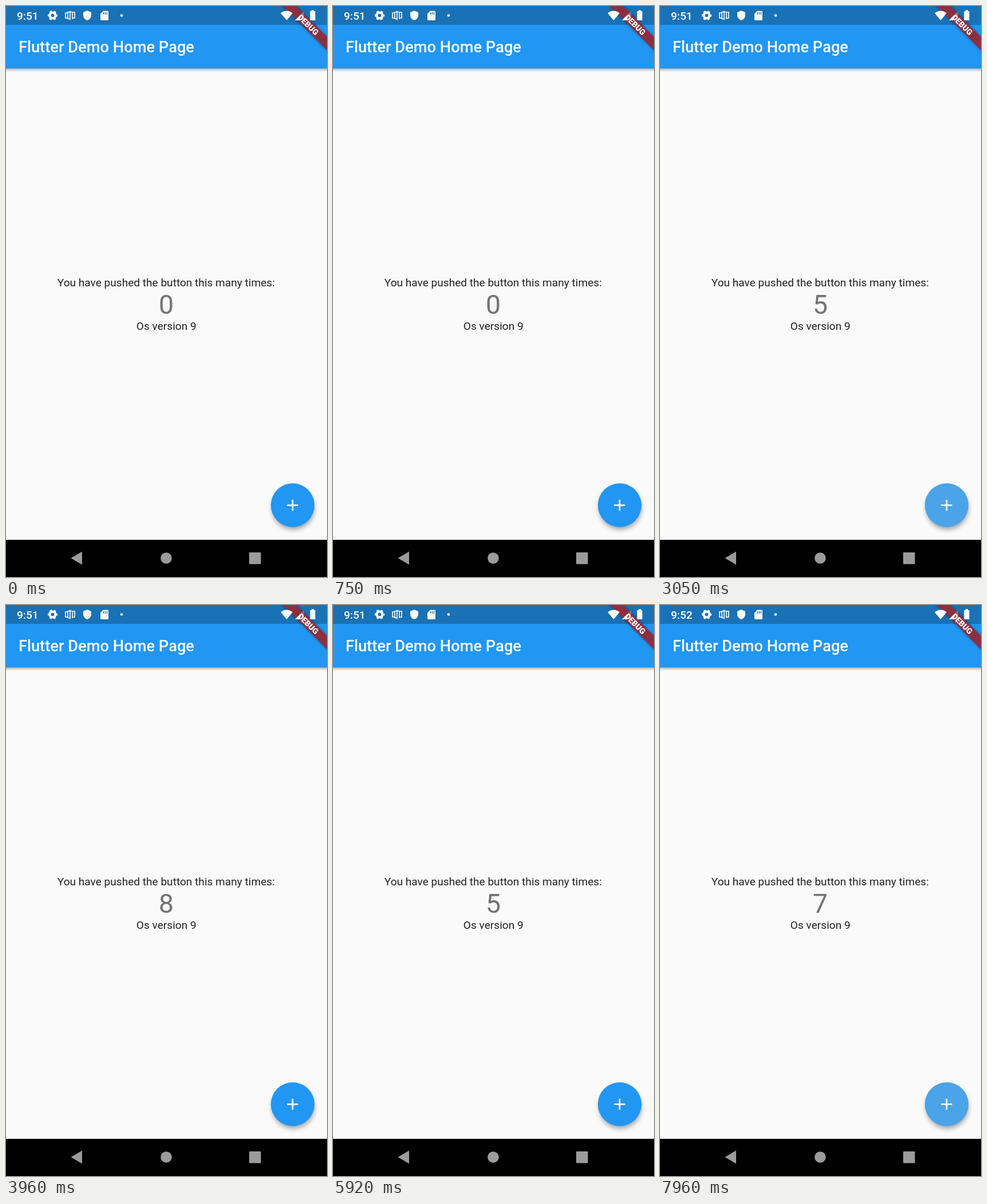
These frames come from a looping animation (561x998 px, 8 s). An HTML page:

```html
<!DOCTYPE html>
<html lang="en">
<head>
<meta charset="utf-8">
<title>Counter demo</title>
<style>
  html, body { margin: 0; width: 100%; height: 100%; overflow: hidden; background: #fafafa; }
  svg { display: block; width: 561px; height: 998px; }
  text { font-family: Roboto, sans-serif; font-size: 19.1px; }
  .mid { text-anchor: middle; }
</style>
</head>
<body>
<svg viewBox="0 0 561 998">
  <defs>
    <clipPath id="disc"><circle cx="501" cy="872.5" r="38.2"/></clipPath>
    <filter id="soft" x="-30%" y="-30%" width="160%" height="160%"><feGaussianBlur stdDeviation="4.5"/></filter>
    <filter id="thin" x="-10%" y="-30%" width="120%" height="160%"><feGaussianBlur stdDeviation="2.5"/></filter>
  </defs>
  <rect width="561" height="998" fill="#fafafa"/>

  <!-- app bar -->
  <rect x="-10" y="34" width="581" height="77" fill="#000" opacity=".4" filter="url(#thin)"/>
  <rect width="561" height="109" fill="#2196f3"/>
  <rect width="561" height="33" fill="#1971b6"/>
  <text x="22" y="81" fill="#fff" style="font-size:27.27px;font-weight:500">Flutter Demo Home Page</text>

  <!-- body -->
  <g class="mid" fill="#000" fill-opacity=".87">
    <text x="279.8" y="489.5">You have pushed the button this many times:</text>
    <text id="count" x="280" y="538" fill-opacity=".54" style="font-size:46.4px">0</text>
    <text x="280.3" y="566">Os version 9</text>
  </g>

  <!-- action button -->
  <circle cx="502" cy="878" r="37" fill="#000" opacity=".36" filter="url(#soft)"/>
  <circle cx="501" cy="872.5" r="38.2" fill="#2196f3"/>
  <g id="ripples" clip-path="url(#disc)" fill="#c8c8c8"></g>
  <path d="M491.3 872.7h19.2M500.9 863.1v19.2" stroke="#fff" stroke-width="2.7"/>

  <!-- corner banner -->
  <g transform="translate(561 0) rotate(45)">
    <rect x="-64" y="38.2" width="128" height="16.4" fill="#000" opacity=".4" filter="url(#thin)"/>
    <rect x="-64" y="38.2" width="128" height="16.4" fill="#8b3040"/>
    <text class="mid" x="0" y="51.4" fill="#fff" style="font-size:13.9px;font-weight:900">DEBUG</text>
  </g>

  <!-- status bar -->
  <g fill="#fff">
    <text id="clock" x="19" y="23.5" style="font-weight:500">9:51</text>
    <circle cx="81.5" cy="16.5" r="5" fill="none" stroke="#fff" stroke-width="4.2"/>
    <circle cx="81.5" cy="16.5" r="7.3" fill="none" stroke="#fff" stroke-width="2.6" stroke-dasharray="3.82" stroke-dashoffset="1.9"/>
    <path d="M104 12v9.5M108 10v13M112 8.5v16M116 10v13M120 11v10M103 12h6M103 21h6M108 10.5h8M108 22.5h4M116 11h5M116 21h5" fill="none" stroke="#fff" stroke-width="1.6"/>
    <path d="M142 8l7 3v5q0 6.500-7 9q-7-2.500-7-9v-5z"/>
    <path d="M170 8.500h7.500q1.500 0 1.500 1.500v13.500q0 1.500-1.500 1.500h-11q-1.500 0-1.500-1.500v-10z"/>
    <path d="M170.500 11v4M173.500 11v4M176.500 11v4" stroke="#1971b6" stroke-width="1.400"/>
    <circle cx="202" cy="16.500" r="2.300"/>
    <path d="M480 12.500q10.500-8 21 0l-10.500 12.500z"/>
    <path d="M505 25l16-16v16z" opacity=".25"/>
    <path d="M505 25l9-9v9z"/>
    <path d="M534 7h4v2h2.500v16h-9v-16h2.500z"/>
  </g>

  <!-- navigation bar -->
  <rect y="933" width="561" height="65" fill="#000"/>
  <g fill="#9b9b9b">
    <path d="M113.500 965l19.500-11.500v23z"/>
    <circle cx="280" cy="965" r="9.800"/>
    <rect x="425" y="955" width="20.500" height="20.500" rx="1"/>
  </g>
</svg>
<script>
const LOOP = 8000, STEP = 182, HOLD = 80;
const $ = id => document.getElementById(id);
const clamp = v => Math.max(0, Math.min(1, v));

// each run restarts the counter, then taps the button at a steady pace
const runs = [
  { reset: 0, first: 2150, taps: 8 },
  { reset: 3985, first: 4007, taps: 5 },
  { reset: 6150, first: 6665, taps: 7 }
];

const ripples = runs.flatMap(run => Array.from({ length: run.taps }, (_, i) => {
  const el = document.createElementNS("http://www.w3.org/2000/svg", "circle");
  $("ripples").append(el);
  return { el, down: run.first + i * STEP };
}));

function drawRipple({ el, down }, t) {
  const age = t - down;
  const grow = clamp(age / 225);
  const p = grow * grow * (3 - 2 * grow) * .5 + grow * .5;
  const fade = 1 - clamp((age - HOLD - 225) / 150);
  el.setAttribute("cx", 492.5 + 8.5 * p);
  el.setAttribute("cy", 872.5);
  el.setAttribute("r", 16 + 43 * p);
  el.setAttribute("opacity", .25 * clamp(age / 40) * fade);
}

function draw(t) {
  const run = runs.findLast(r => t >= r.reset);
  const taps = Math.floor((t - run.first - HOLD) / STEP) + 1;
  $("count").textContent = Math.max(0, Math.min(run.taps, taps));
  $("clock").textContent = t < 6000 ? "9:51" : "9:52";

  // quick taps share one tint: only the newest ripple and a fading older one show
  const active = ripples.filter(r => t >= r.down).slice(-2);
  for (const r of ripples) {
    drawRipple(r, t);
    if (!active.includes(r)) r.el.setAttribute("opacity", 0);
  }
  if (active.length === 2 && t - active[1].down > 120) active[0].el.setAttribute("opacity", 0);
}

const start = performance.now();
function tick(now) {
  draw(Math.max(0, now - start) % LOOP);
  requestAnimationFrame(tick);
}
draw(0);
requestAnimationFrame(tick);
</script>
</body>
</html>
```
